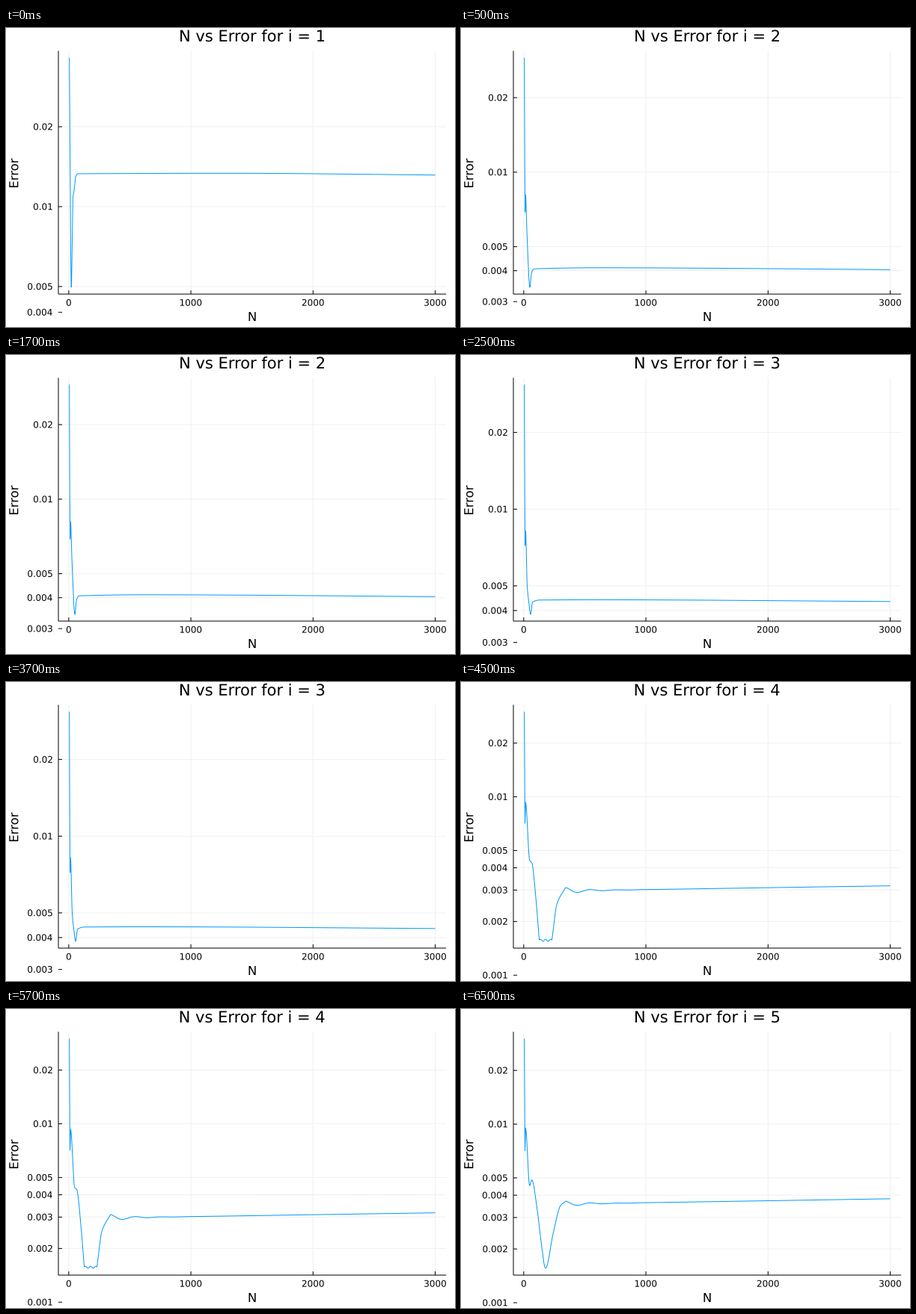
A matplotlib script that plays this animation: 600x400 px, repeating every 8000 ms.

```python
import numpy as np
import matplotlib.pyplot as plt
from matplotlib.animation import FuncAnimation
from matplotlib.patches import PathPatch
from matplotlib.textpath import TextPath
from matplotlib.transforms import Affine2D

WIDTH, HEIGHT, DPI = 600, 400, 100
LEFT, RIGHT, TOP, BOTTOM = 70, 588.2, 30.5, 356
N_MIN, N_MAX, RING_START = 5, 3000, 342
PAD = 0.03 / 1.06  # share of the axis left free on each side of the data
STEP_MS, STEPS = 500, 16
TICKS = [0.02, 0.01, 0.005, 0.004, 0.003, 0.002, 0.001]

plt.rcParams["font.family"] = "DejaVu Sans"
plt.rcParams["path.snap"] = False


def smooth(keys):
    """Monotone cubic through (N, error) keys, in log space."""
    x, y = np.array(keys).T
    y = np.log2(y)
    h, d = np.diff(x), np.diff(y) / np.diff(x)
    a, b = d[:-1], d[1:]
    turning = a * b <= 0
    inner = np.where(turning, 0, 2 * a * b / np.where(turning, 1, a + b))
    slope = np.concatenate([d[:1], inner, d[-1:]])
    t = np.linspace(0, 1, 25)[:, None]
    curve = ((1 + 2 * t) * (1 - t) ** 2 * y[:-1] + t * (1 - t) ** 2 * h * slope[:-1]
             + t ** 2 * (3 - 2 * t) * y[1:] + t ** 2 * (t - 1) * h * slope[1:])
    return (x[:-1] + t * h).T.ravel(), 2 ** curve.T.ravel()


def ringing(keys, start, end, size):
    """Smooth head, then a damped wave around a slow rise."""
    n = np.linspace(RING_START, N_MAX, 500)
    s = n - RING_START
    rise = start * (end / start) ** (s / s[-1])
    tail = rise * 2 ** (size * np.cos(2 * np.pi * s / 208) * np.exp(-s / 159))
    x, y = smooth(keys + [(RING_START, tail[0])])
    return np.append(x, n), np.append(y, tail)


def rippled_floor(n, error):
    return n, np.maximum(error, 0.00157 - 0.00002 * np.cos(2 * np.pi * (n - 157) / 43))


CURVES = [
    smooth([(5, 0.0364), (21, 0.00497), (34, 0.0108), (45, 0.0116), (57, 0.013),
            (75, 0.0133), (1300, 0.01336), (3000, 0.01315)]),
    smooth([(5, 0.029), (11, 0.0069), (15, 0.0081), (26, 0.0057), (50, 0.00343),
            (64, 0.00393), (85, 0.00407), (600, 0.00411), (3000, 0.00404)]),
    smooth([(5, 0.0308), (11, 0.0072), (15, 0.0082), (28, 0.005), (42, 0.0043),
            (56, 0.00387), (72, 0.00432), (130, 0.0044), (600, 0.00441), (3000, 0.00434)]),
    rippled_floor(*ringing([(5, 0.03), (10, 0.0071), (15, 0.0093), (48, 0.0044), (66, 0.00427),
                            (100, 0.00268), (128, 0.00157), (180, 0.001), (230, 0.00157),
                            (271, 0.0025)], 0.00297, 0.00317, 0.061)),
    ringing([(5, 0.0301), (10, 0.0071), (15, 0.0095), (48, 0.00452), (66, 0.00487),
             (105, 0.00354), (136, 0.00236), (179, 0.00156), (240, 0.00243),
             (300, 0.00349)], 0.00357, 0.00382, 0.052),
]

fig = plt.figure(figsize=(WIDTH / DPI, HEIGHT / DPI), dpi=DPI, facecolor="white")
ax = fig.add_axes([0, 0, 1, 1])


def x_of(n):
    return LEFT + (RIGHT - LEFT) * (PAD + (1 - 2 * PAD) * (n - N_MIN) / (N_MAX - N_MIN))


def y_of(error, low, high):
    share = np.log2(error / low) / np.log2(high / low)
    return BOTTOM - (BOTTOM - TOP) * (PAD + (1 - 2 * PAD) * share)


def line(x, y, color="black", **kw):
    ax.plot(x, y, color=color, lw=72 / DPI, solid_capstyle="butt", **kw)


def label(x, y, text, size, anchor=0.5, angle=0):
    """Text outline on baseline y; anchor 0.5 is centred, 1 right aligned."""
    path = TextPath((0, 0), text, size=size)
    box = path.get_extents()
    place = (Affine2D().translate(-box.x0 - anchor * box.width, 0)
             .scale(1, -1).rotate_deg(-angle).translate(x, y))
    ax.add_patch(PathPatch(place.transform_path(path), color="black", lw=0))


def draw(step):
    index = (step + 3) // 4
    n, error = CURVES[index]
    low, high = error.min(), error.max()
    ax.clear()
    ax.axis("off")
    ax.set_xlim(0, WIDTH)
    ax.set_ylim(HEIGHT, 0)

    for tick in range(0, N_MAX + 1, 1000):
        x = x_of(tick)
        line([x, x], [TOP, BOTTOM], "#f0f0f0", zorder=1)
        line([x, x], [BOTTOM, BOTTOM - 5])
        label(x, 371.6, str(tick), 12)

    for tick in TICKS:
        y = y_of(tick, low, high)
        line([LEFT, LEFT + 5], [y, y])
        label(61.7, y + 4.3, f"{tick:g}", 12, anchor=1)
        if y > BOTTOM:  # one tick hangs below the axis
            break
        line([LEFT, RIGHT], [y, y], "#f0f0f0", zorder=1)

    line([LEFT, LEFT], [TOP, BOTTOM])
    line([LEFT, RIGHT], [BOTTOM, BOTTOM])
    line(x_of(n), y_of(error, low, high), "#009afa", zorder=3, solid_joinstyle="round")

    center = (LEFT + RIGHT) / 2
    label(center, 18, f"N vs Error for i = {index + 1}", 21)
    label(center, 392, "N", 16.5)
    label(16.3, (TOP + BOTTOM) / 2 + 0.5, "Error", 16.5, angle=90)
    return []


anim = FuncAnimation(fig, draw, frames=STEPS, interval=STEP_MS, init_func=lambda: [],
                     repeat=True, repeat_delay=0, blit=False)
plt.show()
```
